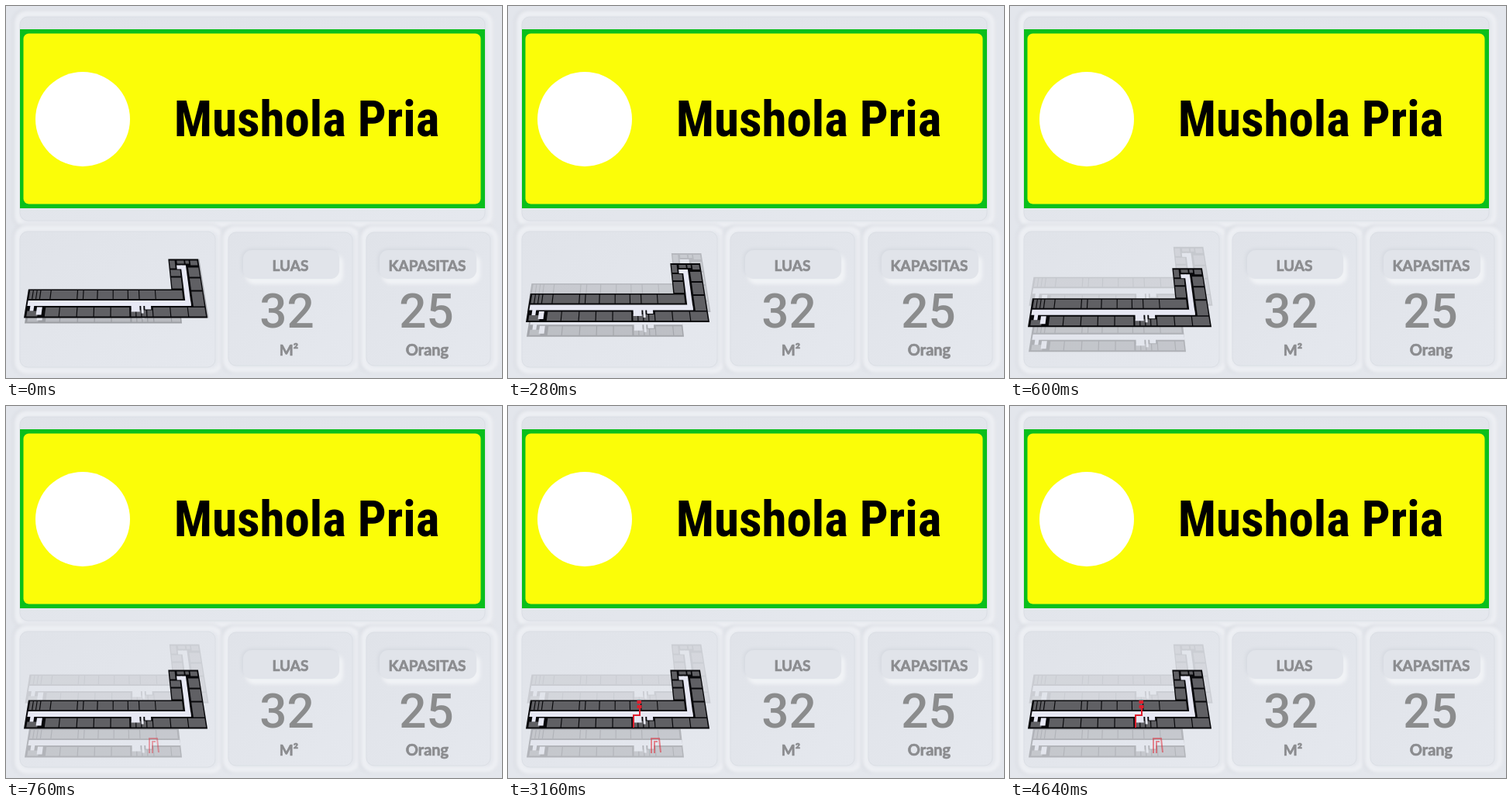
Write an HTML page that moves like this. It is 640 px wide and 480 px high and loops after 5.12 s.

```html
<!DOCTYPE html>
<html lang="id">
<head>
<meta charset="utf-8">
<title>Mushola Pria</title>
<style>
  html, body { margin: 0; width: 100%; height: 100%; overflow: hidden; background: #e3e6ec; }
  svg { display: block; width: 100%; height: 100%; }
  text { text-anchor: middle; }
  .sign { font: 640 65px "Roboto Condensed", Roboto, sans-serif; font-stretch: 75%; }
  .num { font: 500 62px Roboto, sans-serif; fill: #8b8c8d; }
  .label { font: 700 19px Lato, sans-serif; fill: #8b8c8f; stroke: #8b8c8f; stroke-width: .7; }
  .unit { font-size: 20px; }
  .red { fill: none; stroke: #e01f2d; stroke-width: 2; }
</style>
</head>
<body>
<svg id="stage" viewBox="0 0 640 480">
  <defs>
    <filter id="soft" x="-10%" y="-20%" width="120%" height="140%"><feGaussianBlur stdDeviation="2"/></filter>
    <linearGradient id="face" x2="1" y2="1">
      <stop stop-color="#e0e3e9"/><stop offset="1" stop-color="#e5e8ee"/>
    </linearGradient>
  </defs>
  <rect width="640" height="480" fill="#e3e6ec"/>
  <g id="panels"></g>

  <rect x="18" y="30" width="600" height="231" fill="#0abf1c"/>
  <rect x="22.5" y="35.5" width="590" height="220" rx="7" fill="#fbfd08"/>
  <circle cx="99" cy="146" r="61" fill="#fff"/>
  <text class="sign" x="388" y="168">Mushola Pria</text>

  <text class="label" x="367" y="342">LUAS</text>
  <text class="num" x="362.5" y="415">32</text>
  <text class="label" x="365" y="451">M²</text>
  <text class="label" x="543.5" y="342">KAPASITAS</text>
  <text class="num" x="542.5" y="415">25</text>
  <text class="label unit" x="543.5" y="450.5">Orang</text>

  <g id="lower"></g>
  <g id="upper"></g>
  <g id="middle"></g>
  <path id="start" class="red" stroke-opacity=".5" d="M185 448V429H195L197 447M189 448V433H193"/>
  <path id="walk" class="red" pathLength="1" stroke-dasharray="1 2" d="M162 415V399H170V394"/>
  <path id="enter" class="red" pathLength="1" stroke-dasharray="1 2" d="M170 394V388"/>
  <path id="room" fill="#e01f2d" d="M166.5 380h5.5v4h-5.5zM166.5 386h6v4h-6z"/>
</svg>
<script>
const $ = id => document.getElementById(id);
const LOOP = 5120;

// Raised panels: shade to the upper left, light to the lower right, then the face
const rect = (x, y, w, h, r, attrs) =>
  `<rect x="${x}" y="${y}" width="${w}" height="${h}" rx="${r}" ${attrs}/>`;
const panel = (x, y, w, h) =>
  rect(x - 8, y - 8, w + 16, h + 16, 14, 'fill="none" stroke="#dbdee4" stroke-width="4" filter="url(#soft)"') +
  rect(x - 3, y - 4, w + 10, h + 9, 12, 'fill="none" stroke="#eef0f4" stroke-width="7" filter="url(#soft)"') +
  rect(x, y, w, h, 10, 'fill="url(#face)" stroke="#dbdfe5"');
const pill = (x, y, w, h) =>
  rect(x + 3, y + 5, w + 2, h + 2, 12, 'fill="#f1f3f6" filter="url(#soft)"') +
  rect(x - 2, y - 2, w, h, 12, 'fill="#d5d9e0" filter="url(#soft)"') +
  rect(x, y, w, h, 11, 'fill="#e1e4ea"');

$('panels').innerHTML =
  panel(18, 14, 600, 263) + panel(18, 291, 252, 175) +
  panel(287, 292, 160, 172) + panel(465, 292, 160, 172) +
  pill(306, 315, 124, 37) + pill(482, 315, 125, 37);

// Floor plan in (u across, d deep), seen with slight perspective
const point = ([u, d]) =>
  `${(142 + u * (1 - .00135 * d)).toFixed(1)},${416.5 - d}`;
const poly = (fill, ...pts) => `<polygon fill="${fill}" points="${pts.map(point).join(' ')}"/>`;
const box = (a, b, d, e, fill = '#606064') =>
  poly(fill, [a, d], [b, d], [b, e], [a, e]);
const row = (marks, d, e) =>
  marks.slice(1).map((b, i) => box(marks[i] + .6, b - .6, d, e)).join('');

const PALE = '#e7e8f4', DARK = '#08080b';
const BACK = [-117, -112, -107, -102, -88, -52, -44, -25, -4, 16, 31, 53];
const FRONT = [-93, -74, -51, -29, -7, 18];

function floor(wing) {
  const end = wing ? 118 : 84;
  let s = wing
    ? poly(DARK, [-119, 0], [118, 0], [118, 76], [75, 76], [75, 37], [-119, 37])
    : box(-119, 84, 0, 37, DARK);
  s += box(-117, wing ? 99 : end, 15.5, 22.5, PALE);
  s += row([...BACK, wing ? 90 : 82], 24.5, 35.5);
  s += row(FRONT, 2, 13.5);
  s += box(-116, -102, 2, 9) + box(-104, -97, 4, 14, PALE) + box(-113, -108, 9, 17, PALE);
  s += row([19, 26, 33, 40, 48], 2, 10);
  s += box(20, 31, 8, 17, PALE) + box(33, 36, 6, 17, PALE) + box(38, 46, 11, 17, PALE);
  s += row(wing ? [48, 71, 94, 117] : [48, 71, 83], 2, 13.5);
  if (wing) {
    s += box(92, 99, 16, 68, PALE) + box(86, 93, 63, 68, PALE);
    s += box(76.5, 90, 38, 52) + box(76.5, 90, 54, 62) + box(76.5, 84, 64, 74);
    s += box(87, 97, 70, 74) + box(99, 104, 70, 74) + box(106, 116, 68, 74);
    s += box(102, 116.5, 15, 34) + box(102, 116.5, 36, 51) + box(102, 116.5, 53, 65);
  }
  return s;
}
$('lower').innerHTML = floor(false);
$('middle').innerHTML = floor(true);
$('upper').innerHTML = floor(true);

const ramp = (t, a, b) => Math.min(1, Math.max(0, (t - a) / (b - a)));
const shift = (id, y, x = 0) => $(id).setAttribute('transform', `translate(${x} ${y})`);
const fade = (id, v) => $(id).setAttribute('opacity', v);
const trace = (id, v) => {
  $(id).setAttribute('stroke-dashoffset', 1 - v);
  $(id).setAttribute('visibility', v > 0 ? 'visible' : 'hidden');
};

function draw(t) {
  const p = ramp(t, 0, 720);
  const mid = -14 + 14 * p;
  shift('middle', mid);
  shift('upper', mid - 33 * p, 1.5);
  shift('lower', mid + 7 + 30 * p, 1);
  fade('upper', .26 - .16 * p);
  fade('lower', .32 - .1 * p);
  fade('start', t >= 640 ? .6 + .4 * ramp(t, 640, 1000) : 0);
  trace('walk', ramp(t, 1600, 2040));
  trace('enter', ramp(t, 2400, 2560));
  fade('room', ramp(t, 2920, 3160));
}

const begin = performance.now();
function tick() {
  draw((performance.now() - begin) % LOOP);
  requestAnimationFrame(tick);
}
tick();
</script>
</body>
</html>
```
